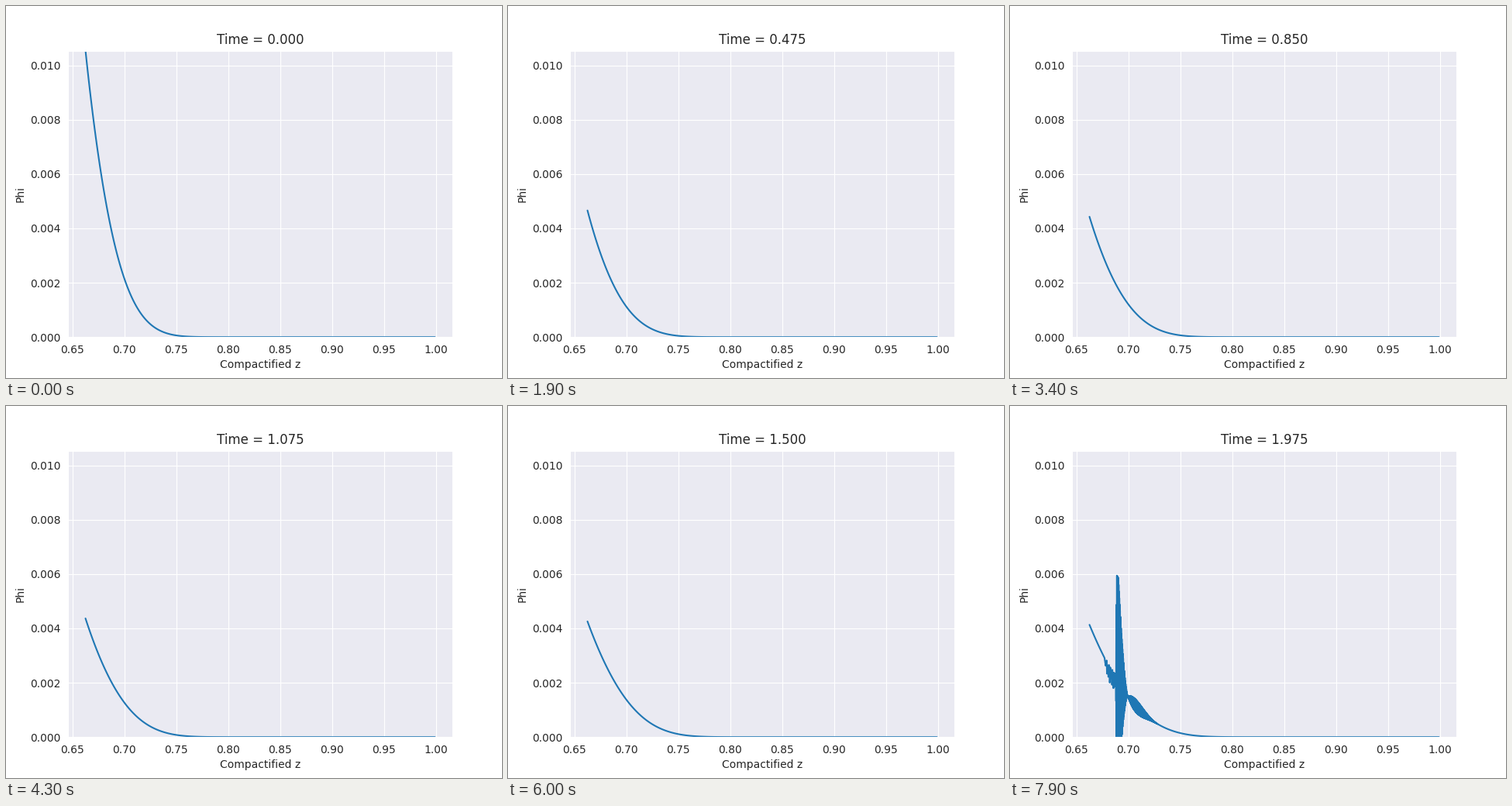
A matplotlib script for the animation above (8 s loop, 640 by 480 pixels).

```python
import numpy as np
import matplotlib.pyplot as plt
from matplotlib.animation import FuncAnimation

FRAMES, INTERVAL, DT = 80, 100, 0.025
T_END = (FRAMES - 1) * DT
GROWTH = 32  # rate of the late numerical instability
INK = "0.15"

plt.rcParams.update({
    "font.family": "DejaVu Sans",
    "axes.facecolor": "#EAEAF2", "axes.edgecolor": "white",
    "axes.labelcolor": INK, "text.color": INK,
    "xtick.color": INK, "ytick.color": INK,
    "xtick.bottom": False, "ytick.left": False,
    "axes.grid": True, "axes.axisbelow": True,
    "grid.color": "white", "grid.linestyle": "-",
    "lines.solid_capstyle": "round",
    "path.simplify": False,
})

z = np.linspace(0.66265, 0.9990, 2001)
r2 = (z / (1 - z)) ** 2


def ramp(start, end):
    return np.clip((z - start) / (end - start), 0, 1)


def make_ripple():
    """Grid-scale noise: a ragged foot, a tall spike and a tapering tail."""
    front, node, end = 0.6880, 0.6997, 0.7317
    sign = np.where(np.arange(z.size) % 2, 1, -1)
    noise = np.random.default_rng(4).uniform(-0.55, 0.12, z.size)
    foot = noise * ramp(0.6770, 0.6800) * (z < front)
    spike = 3.85 * ramp(front, front + 0.001) * (1 - ramp(0.6904, node)) ** 1.7
    u = ramp(node, end)
    tail = 2.2 * u * (1 - u) ** 3
    return 1e-3 * (foot + sign * (spike + tail))


ripple = make_ripple()


def phi(t):
    """Gaussian pulse that drops fast, then slowly spreads outwards."""
    amp = 0.2202 - 0.0123 * t + 0.2798 * np.exp(-7.2 * t - 1.5 * t * t)
    spread = (0.24 * t - 0.031 * t * t) * (1 - np.exp(-7 * t))
    mean = amp * np.exp(-r2 + spread * (r2 - r2[0]))
    return mean + ripple * np.exp(GROWTH * (t - T_END))


fig, ax = plt.subplots(figsize=(6.4, 4.8), dpi=100)
line, = ax.plot(z, phi(0), color="#1f77b4", lw=1.5)
ax.set_ylim(0, 0.010542)
ax.set_xlabel("Compactified z")
ax.set_ylabel("Phi")
title = ax.set_title("Time = 0.000")


def update(i):
    t = i * DT
    line.set_ydata(phi(t))
    title.set_text(f"Time = {t:.3f}")
    return line, title


anim = FuncAnimation(fig, update, frames=FRAMES, interval=INTERVAL,
                     repeat=True, repeat_delay=0)
plt.show()
```
